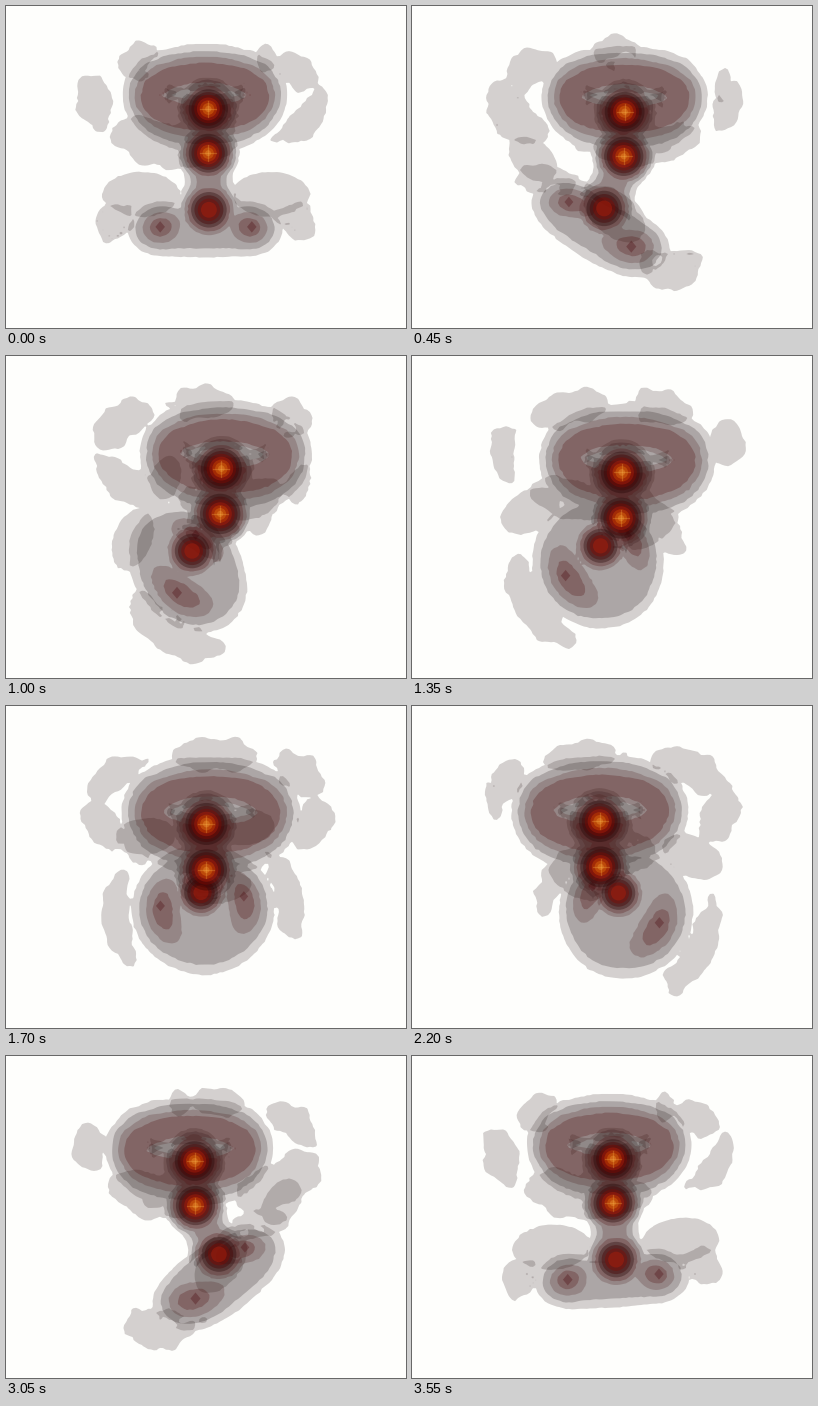
Animation, 400 px wide and 322 px high, one loop 3.6 s. Source, as a matplotlib script:

```python
import numpy as np
import matplotlib.pyplot as plt
from matplotlib.animation import FuncAnimation
from matplotlib.patches import Circle, Polygon

W, H, FRAMES = 400, 322, 72
CX, CY, DIST = 200, 161, 390
COS_E, SIN_E = np.sqrt(2 / 3), np.sqrt(1 / 3)
TURNS = 288                     # azimuth cells of the density table
CELL, R_MAX, Z_MAX = 2, 150, 130
BLEND = 2.5                     # sharpness of the joins between parts

# Atoms: position, outer radius, radius step per shell, number of shells
ATOMS = [((2.2, 14.5, 57), 29, 2.6, 11),
         ((2.2, 14.5, 7), 31, 2.8, 11),
         ((3, -14.5, -44), 32, 3.4, 8)]
LOBES = [(-48, -21, -62), (48, -21, -62)]

# Shell colours (0-255) and opacities, from the outside in
SHELLS = [((22, 3, 3), .18), ((14, 2, 2), .20), ((60, 10, 10), .20),
          ((80, 12, 12), .27), ((30, 0, 0), .33), ((70, 0, 0), .38),
          ((130, 8, 0), .40), ((180, 30, 8), .42), ((200, 65, 0), .48),
          ((218, 108, 15), .48), ((235, 145, 45), .45)]
SURFACES = 4                    # shells drawn as contours; the rest are spheres


def rgb(c):
    return tuple(v / 255 for v in c)


# ---- density, in units of shell number ----

def ball(x, y, z, c, r, step):
    d = np.sqrt((x - c[0])**2 + (y - c[1])**2 + (z - c[2])**2)
    return np.minimum((r - d) / step, 4)


def blob(x, y, z, c, half):
    e = np.sqrt(sum(((p - q) / h)**2 for p, q, h in zip((x, y, z), c, half)))
    return np.minimum(2.5 * (1 - e), .8)


def neck(x, y, z, a, b):
    a, b = np.array(a), np.array(b)
    ab = b - a
    t = ((x - a[0]) * ab[0] + (y - a[1]) * ab[1] + (z - a[2]) * ab[2]) / (ab @ ab)
    t = np.clip(t, 0, 1)
    d = np.sqrt((x - a[0] - t * ab[0])**2 + (y - a[1] - t * ab[1])**2
                + (z - a[2] - t * ab[2])**2)
    return np.minimum((24 - d) / 6, 2.6)


def upper_ring(x, y, z):
    d = np.hypot(x + 1, y - 17) - 47
    flat = 1.15 - .25 * np.clip(d / 15, -1, 1)
    d = np.where(d < 0, 2.1 * d, d)
    return np.minimum((27.5 - np.hypot(d, flat * (z - 72))) / 5.3, 3.7)


def tilted(x, y, z, cy, cz):
    """In-plane and normal coordinates of the lower, tilted plane."""
    y, z = y - cy, z - cz
    return x + 1, -.8 * y + .6 * z, .6 * y + .8 * z


def disc(p, q, n):
    d = np.hypot(np.maximum(np.hypot(p, q) - 45, 0), 1.4 * n)
    return np.minimum((30 - d) / 10, 1.5)


def arc(p, q, n, radius, mid, half, wide, high, top, rough=0):
    turn = (np.degrees(np.arctan2(q, p)) - mid + 180) % 360 - 180
    e = np.sqrt(((np.hypot(p, q) - radius) / wide)**2
                + (n / high)**2 + (turn / half)**2)
    return np.minimum(2.5 * (1 - e + rough), top)


def density(x, y, z):
    rough = .28 * np.sin(x / 6) * np.sin(y / 7 + 1) * np.sin(z / 6 + .5)
    total = 0

    def parts():
        for c, r, step, _ in ATOMS:
            yield ball(x, y, z, c, r, step)
        yield neck(x, y, z, ATOMS[1][0], ATOMS[2][0])
        yield upper_ring(x, y, z)
        for side in (-1, 1):
            yield blob(x, y, z, (56 * side, -55, 9), (34, 16, 22))
        yield blob(x, y, z, (0, 52, 14), (34, 12, 16))
        for mid, half, wide in ((25, 16, 11), (50, 6, 6), (135, 16, 11),
                                (195, 20, 13), (255, 28, 14), (328, 24, 8)):
            yield arc(x, y - 5, z - 82, 97, mid, half, wide, 17, .8, rough)
        plane = tilted(x, y, z, -17, -66)
        yield disc(*plane)
        outer = tilted(x, y, z, -12, -62)
        for mid in (0, 180):
            yield 2 + arc(*plane, 47, mid, 44, 18, 15, 1.8)
            yield arc(*outer, 99, mid, 30, 14, 18, .8, rough)

    for v in parts():
        total = total + np.exp(BLEND * v)
    return np.log(total + 1e-9) / BLEND


def density_table():
    """Density on a cylindrical grid, azimuth repeated so a turn is an offset."""
    z = np.arange(-Z_MAX, Z_MAX + 1, CELL, dtype=np.float32)[:, None, None]
    r = np.arange(0, R_MAX + 1, CELL, dtype=np.float32)[None, :, None]
    a = (np.arange(TURNS) * 2 * np.pi / TURNS).astype(np.float32)
    x, y = r * np.cos(a), r * np.sin(a)
    zz = np.broadcast_to(z, (z.size, r.size, TURNS))
    t = density(x, y, zz).astype(np.float32)
    t[:, -1] = t[0] = t[-1] = -9
    return np.concatenate([t, t], axis=2)


def ray_index(xs, ys):
    """Flat table index of each sample along each view ray, depth first."""
    w = np.arange(-150, 151, 5.)[:, None, None]
    s = 1 + w / DIST
    x = (xs[None, None, :] - CX) * s
    up = (CY - ys[None, :, None]) * s
    y = w * COS_E + up * SIN_E
    z = up * COS_E - w * SIN_E
    nz, nr = 2 * Z_MAX // CELL + 1, R_MAX // CELL + 1
    iz = np.clip(np.rint((z + Z_MAX) / CELL), 0, nz - 1).astype(int)
    ir = np.clip(np.rint(np.hypot(x, y) / CELL), 0, nr - 1).astype(int)
    ia = np.rint(np.arctan2(y, x) * TURNS / (2 * np.pi)).astype(int) % TURNS
    return (iz * nr + ir) * 2 * TURNS + ia


def project(point, theta):
    x, y, z = point
    c, s = np.cos(theta), np.sin(theta)
    x, y = x * c + y * s, y * c - x * s
    depth = y * COS_E - z * SIN_E
    k = DIST / (DIST + depth)
    return CX + k * x, CY - k * (z * COS_E + y * SIN_E), k


xs = np.arange(58, 344, 3.)
ys = np.arange(14, 312, 3.)
table = density_table().ravel()
rays = ray_index(xs, ys)

fig = plt.figure(figsize=(W / 100, H / 100), dpi=100,
                 facecolor=rgb((254, 254, 252)))
ax = fig.add_axes([0, 0, 1, 1])
ax.set_xlim(0, W)
ax.set_ylim(H, 0)
ax.axis('off')

spheres = []
for c, r, step, count in ATOMS:
    shells = []
    for i in range(SURFACES, count):
        color, alpha = SHELLS[i]
        shells.append((ax.add_patch(Circle((0, 0), 1, fc=rgb(color),
                                           alpha=alpha, lw=0)), r - step * i))
    glint = []
    if count > 8:
        glint = [ax.plot([], [], color=rgb((250, 185, 80)), lw=.9,
                         alpha=.28)[0] for _ in range(2)]
    spheres.append((c, shells, glint))

diamonds = [ax.add_patch(Polygon([(0, 0)] * 4, fc=rgb((70, 0, 5)),
                                 alpha=.3, lw=0)) for _ in LOBES]
layers = []


def fill(field, i):
    if field.max() > i:
        color, alpha = SHELLS[i]
        layers.append(ax.contourf(xs, ys, field, levels=[i, 99],
                                  colors=[rgb(color)], alpha=alpha,
                                  zorder=1 + i, antialiased=True))


def update(frame):
    theta = 2 * np.pi * frame / FRAMES
    while layers:
        layers.pop().remove()

    v = np.take(table, rays + frame * TURNS // FRAMES)
    before = np.maximum.accumulate(v, axis=0)
    after = np.maximum.accumulate(v[::-1], axis=0)[::-1]
    both = np.minimum(before, after)
    for i in range(SURFACES):
        fill(before[-1], i)
        # rays that clearly leave the shell and enter it again
        fill(np.minimum(both, 2 * i - v).max(axis=0) - .15, i)

    for c, shells, glint in spheres:
        x, y, k = project(c, theta)
        for n, (circle, r) in enumerate(shells):
            circle.center = x, y
            circle.radius = r * k
            circle.set_zorder(10 + 10 * k + n * .001)
        for line, (dx, dy) in zip(glint, ((8, 0), (0, 8))):
            line.set_data([x - dx, x + dx], [y - dy, y + dy])
            line.set_zorder(10 + 10 * k + .02)

    for patch, c in zip(diamonds, LOBES):
        x, y, k = project(c, theta)
        patch.set_xy([(x - 5 * k, y), (x, y - 6 * k),
                      (x + 5 * k, y), (x, y + 6 * k)])
        patch.set_zorder(9)
    return []


anim = FuncAnimation(fig, update, frames=FRAMES, interval=50,
                     init_func=lambda: [], repeat=True, repeat_delay=0,
                     blit=False)
plt.show()
```
